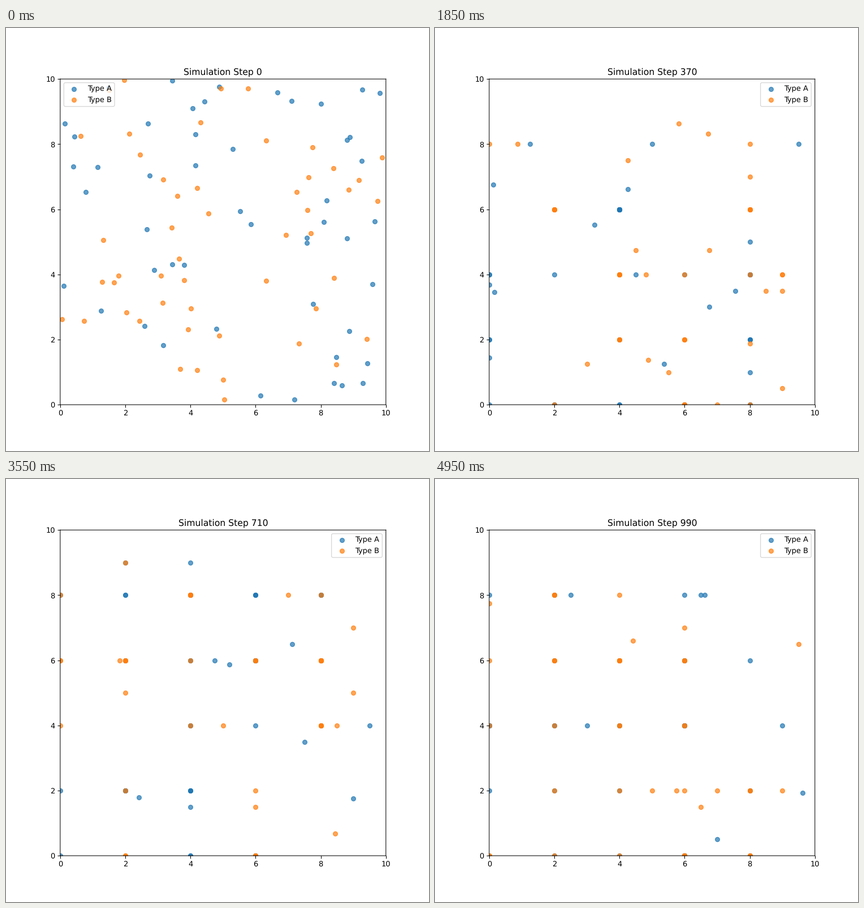
Animation, 748 px wide and 748 px high, one loop 5000 ms. Source, as a matplotlib script:

```python
import numpy as np
import matplotlib.pyplot as plt
from matplotlib.animation import FuncAnimation

FRAMES = 100
STEPS_PER_FRAME = 10
COUNT = 50
SIZE = 10
CELL = 2
SITES = SIZE // CELL
KINDS = [("C0", "Type A"), ("C1", "Type B")]


def clustered(rng, n):
    """Particles gathered unevenly on the lattice sites."""
    weights = rng.gamma(1.0, size=SITES * SITES)
    site = rng.choice(SITES * SITES, size=n, p=weights / weights.sum())
    return CELL * np.column_stack([site % SITES, site // SITES]).astype(float)


def scattered(rng, n, step):
    """Free particles at halvings of the lattice, coarser as time goes on."""
    depth = rng.geometric(0.15 + 0.0002 * step, size=(n, 1))
    depth = np.minimum(depth + int(8 * np.exp(-step / 100)), 20)
    parts = 2.0 ** depth
    pos = np.floor(rng.random((n, 2)) * SITES * parts) * CELL / parts
    # Late free particles mostly sit on a lattice line along one axis.
    snap = np.flatnonzero(rng.random(n) < 0.0007 * step)
    axis = rng.integers(2, size=len(snap))
    pos[snap, axis] = np.floor(pos[snap, axis] / CELL) * CELL
    return pos


def positions(kind, frame):
    step = frame * STEPS_PER_FRAME
    rng = np.random.default_rng([kind, frame])
    share = 0.19 + 0.6 * np.exp(-step / 250) + 0.21 * np.exp(-step / 60)
    free = rng.binomial(COUNT, min(share, 1))
    return np.vstack([clustered(rng, COUNT - free), scattered(rng, free, step)])


plt.rcParams.update({"font.family": "DejaVu Sans", "text.hinting": "no_hinting"})
fig = plt.figure(figsize=(8, 8), dpi=93.5)
ax = fig.add_axes([0.1281, 0.1094, 0.77, 0.77])
ax.set(xlim=(0, SIZE), ylim=(0, SIZE))
ticks = range(0, SIZE + 1, CELL)
ax.set(xticks=ticks, yticks=ticks)
groups = [
    ax.scatter(*positions(kind, 0).T, color=color, alpha=0.7, label=label)
    for kind, (color, label) in enumerate(KINDS)
]
legend = ax.legend(loc="upper left")
title = ax.set_title("Simulation Step 0")

# Keep lines and markers at fractional pixel positions.
for artist in ax.findobj():
    artist.set_snap(False)


def update(frame):
    for kind, group in enumerate(groups):
        group.set_offsets(positions(kind, frame))
    legend.set_loc("upper right" if frame else "upper left")
    title.set_text(f"Simulation Step {frame * STEPS_PER_FRAME}")
    return [*groups, legend, title]


anim = FuncAnimation(fig, update, frames=FRAMES, interval=50,
                     repeat=True, repeat_delay=0, blit=False)
plt.show()
```
